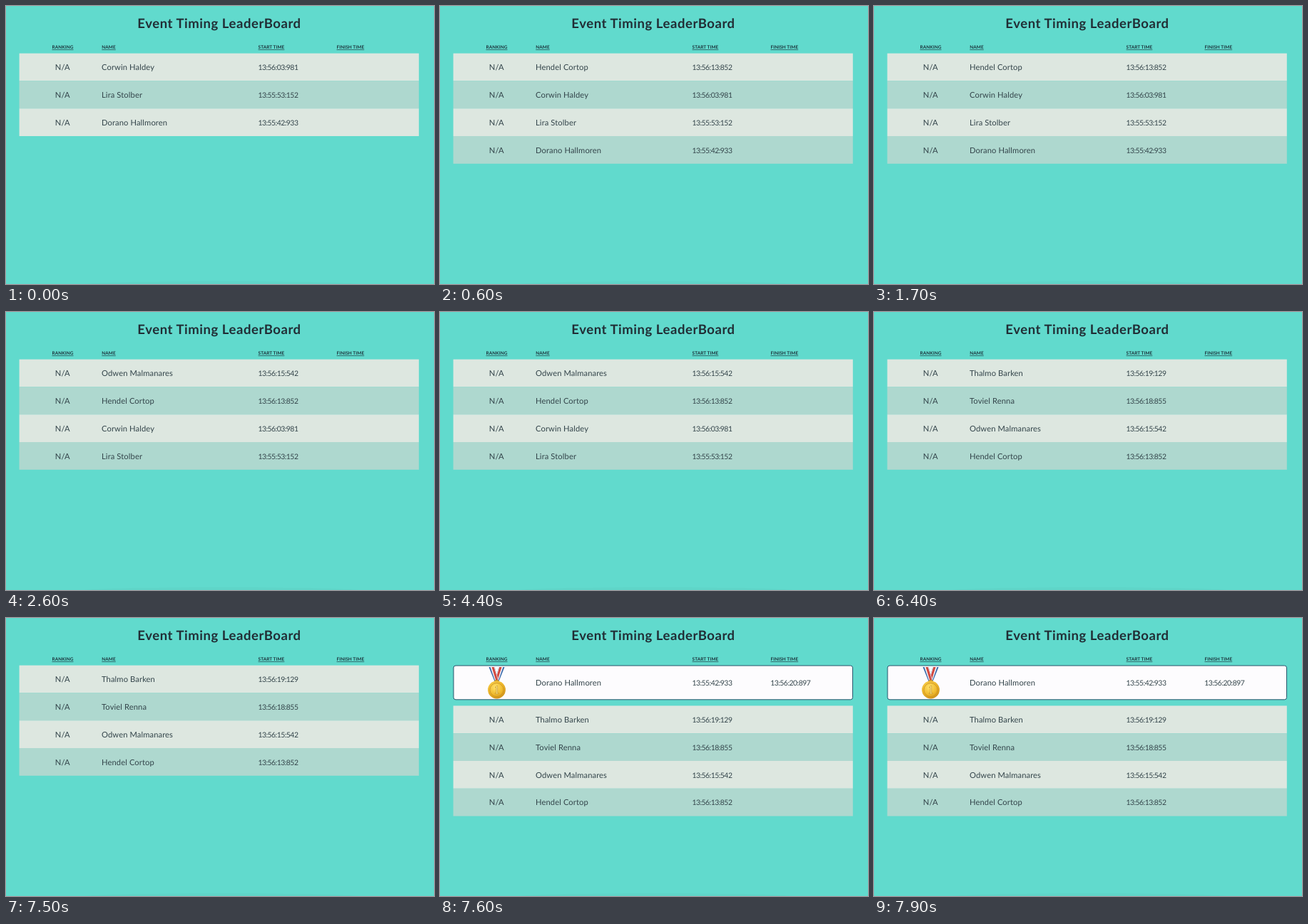
Animation of 600 by 391 pixels, one loop 8 s. Source, as an HTML page:

```html
<!DOCTYPE html>
<html lang="en">
<head>
<meta charset="utf-8">
<title>Event Timing LeaderBoard</title>
<style>
  html, body { margin: 0; width: 100%; height: 100%; overflow: hidden; background: #61dacd; }
  svg { display: block; width: 600px; height: 391px; }
  text {
    font-family: Lato, "Open Sans", sans-serif; font-size: 11.2px; letter-spacing: .1px;
    fill: #33444a; text-rendering: geometricPrecision;
  }
  .title { font-size: 18.5px; font-weight: 700; letter-spacing: .55px; text-anchor: middle; fill: #212d35; }
  .head { font-size: 6.4px; font-weight: 700; fill: #1c343c; }
  .mid { text-anchor: middle; }
  .head, .head.mid { text-decoration: underline; text-decoration-thickness: .6px; }
  .time { font-size: 10.4px; letter-spacing: -.5px; }
</style>
</head>
<body>
<svg viewBox="0 0 600 391">
  <defs>
    <radialGradient id="gold" cx=".42" cy=".35" r=".7">
      <stop offset="0" stop-color="#ffe169"/>
      <stop offset=".6" stop-color="#efb92c"/>
      <stop offset="1" stop-color="#c88a16"/>
    </radialGradient>
    <g id="strap">
      <path d="M-11 0h8l6 20h-6z" fill="#2f62a8"/>
      <path d="M-9 0h6l6 20h-5z" fill="#f4f2f5"/>
      <path d="M-7 0h3.2l6 20h-3z" fill="#d3483f"/>
    </g>
    <g id="medal">
      <use href="#strap" transform="scale(-1 1)"/>
      <use href="#strap"/>
      <rect x="-3" y="18" width="6" height="4" rx="1.5" fill="#c9922a"/>
      <circle cy="32" r="12.4" fill="url(#gold)"/>
      <circle cy="32" r="9.6" fill="none" stroke="#c98f1d" stroke-width=".8"/>
      <path d="M-2.4 28.6L.2 26.4h1v10.2h1.6v1.2h-5v-1.2h1.6v-8z" fill="#fbe58a" stroke="#b97d12" stroke-width=".5"/>
    </g>
  </defs>
  <rect width="600" height="391" fill="#61dacd"/>
  <ellipse cx="302" cy="392" rx="196" ry="5" fill="#000" opacity=".025"/>
  <text class="title" x="299" y="31">Event Timing LeaderBoard</text>
  <text class="head mid" x="79.5" y="60.3">RANKING</text>
  <text class="head" x="134.3" y="60.3">NAME</text>
  <text class="head" x="353.6" y="60.3">START TIME</text>
  <text class="head" x="463.5" y="60.3">FINISH TIME</text>
  <g id="board"></g>
</svg>
<script>
const LOOP = 8000, TOP = 66.6, ROW = 38.8, MAX_ROWS = 4;
const WIN_AT = 7600;

// Starters in order, with the moment each one appears on the board
const starters = [
  { name: "Dorano Hallmoren", start: "13:55:42:933", at: 0 },
  { name: "Lira Stolber", start: "13:55:53:152", at: 0 },
  { name: "Corwin Haldey", start: "13:56:03:981", at: 0 },
  { name: "Hendel Cortop", start: "13:56:13:852", at: 500 },
  { name: "Odwen Malmanares", start: "13:56:15:542", at: 2200 },
  { name: "Toviel Renna", start: "13:56:18:855", at: 5500 },
  { name: "Thalmo Barken", start: "13:56:19:129", at: 5800 }
];

const board = document.getElementById("board");
const label = (str, x, y, cls = "") => `<text class="${cls}" x="${x}" y="${y}">${str}</text>`;

function person(p, y) {
  return label(p.name, 134, y) + label(p.start, 353.4, y, "time");
}

function row(p, i, top) {
  const y = top + i * ROW, base = y + 23.5;
  const fill = i % 2 ? "#aed8cf" : "#dde7e0";
  return `<rect x="18.6" y="${y}" width="560.2" height="${ROW}" fill="${fill}"/>` +
    label("N/A", 79.2, base, "mid") + person(p, base);
}

function winnerCard(p) {
  return `<rect x="19" y="67" width="559.5" height="47.8" rx="3" fill="#fdfcfe" stroke="#28556b"/>` +
    `<use href="#medal" x="79.5" y="69"/>` +
    person(p, 95.1) + label("13:56:20:897", 463.2, 95.1, "time");
}

let shown = "";
function draw() {
  const t = (performance.now() - begin) % LOOP;
  const won = t >= WIN_AT;
  const list = starters.filter(p => t >= p.at).reverse().slice(0, MAX_ROWS);
  const key = list[0].name + won;
  if (key !== shown) {
    shown = key;
    const top = won ? 123.4 : TOP;
    board.innerHTML = (won ? winnerCard(starters[0]) : "") +
      list.map((p, i) => row(p, i, top)).join("");
  }
  requestAnimationFrame(draw);
}

const begin = performance.now();
draw();
</script>
</body>
</html>
```
